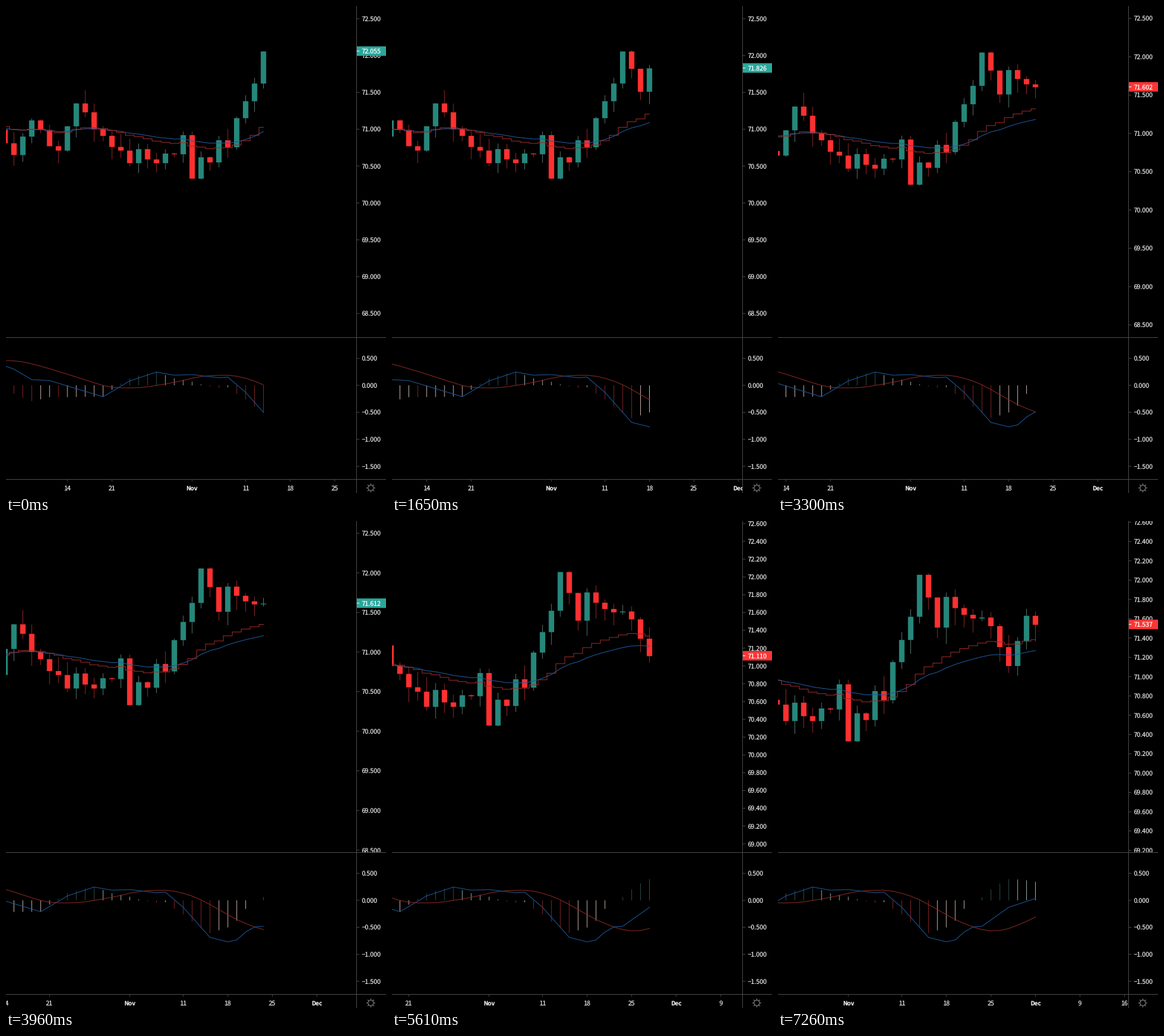
Animation, 600 px wide and 769 px high, one loop 7.59 s. Source, as a matplotlib script:

```python
import numpy as np
import matplotlib.pyplot as plt
from matplotlib.animation import FuncAnimation
from matplotlib.patches import Circle, Rectangle

W, H, DPI = 600, 769, 64
PX = 72 / DPI                      # points per pixel
FRAMES, INTERVAL = 23, 330

# Bars are numbered so that bar 0 is the newest one when the loop starts.
FIRST, LAST = -29, 13
LAST_X, GAP, BODY = 406.5, 14.07, 8.6
AXIS_X, SPLIT_Y, TIME_Y = 553.5, 523.5, 747.5
ZERO_Y, UNIT = 599, 85.2           # oscillator zero line and pixels per 1.0
DATES = {-22: "14", -17: "21", -8: "Nov", -2: "11", 3: "18", 8: "25",
         13: "Dec", 18: "9", 23: "16"}

BG, RULE, LABEL = "#000000", "#484848", "#e0e0e0"
UP, DOWN = "#26877b", "#ff3030"
UP_WICK, DOWN_WICK = "#52706a", "#902626"
UP_TAG, DOWN_TAG = "#2aa79b", "#ff3535"
BLUE, RED = "#1d5aa0", "#a02a29"
MACD, SIGNAL = "#1c5799", "#8c2822"

plt.rcParams.update({"font.family": "Noto Sans CJK JP", "path.snap": False,
                     "text.hinting": "none"})


def ema(values, length, start):
    out = [start]
    for v in values[1:]:
        out.append(out[-1] + (v - out[-1]) * 2 / (length + 1))
    return np.array(out)


def make_wicks(body_open, body_close):
    """Random shadows, longest above falling bars, kept inside the range."""
    rng = np.random.default_rng(5)
    size = len(body_close)
    above = rng.uniform(0, 0.18, size) * np.where(body_close > body_open, 0.5, 1)
    below = rng.uniform(0, 0.18, size)
    high = np.minimum(np.maximum(body_open, body_close) + above, 72.07)
    low = np.maximum(np.minimum(body_open, body_close) - below, 70.32)
    return high, low


# Each bar opens where the one before it closed.
PRICES = np.array([
    70.997, 70.81, 70.65, 70.90, 71.12, 70.99, 70.77, 70.71, 71.04, 71.35,
    71.23, 71.00, 70.91, 70.76, 70.71, 70.54, 70.73, 70.59, 70.54, 70.67,
    70.66, 70.92, 70.33, 70.62, 70.55, 70.85, 70.756, 71.15, 71.38, 71.62,
    72.055, 71.82, 71.508, 71.826, 71.71, 71.64, 71.602, 71.612, 71.523,
    71.306, 71.110, 71.369, 71.63, 71.537])
OPEN, CLOSE = PRICES[:-1], PRICES[1:]
RISING = CLOSE > OPEN
HIGH, LOW = make_wicks(OPEN, CLOSE)
SLOW, FAST = ema(CLOSE, 34, 71.014), ema(CLOSE, 20, 71.035)

# Turning points of the oscillator: bar and pixel height in its pane.
TURNS = np.array([
    (-38, 569), (-34, 550), (-30, 563), (-28, 573.5), (-26, 590), (-24, 591.5),
    (-18, 617), (-15, 592), (-12, 578), (-10, 583), (-8, 582), (-5, 587),
    (-4, 586), (-2, 610), (1, 657.5), (3, 664.5), (4, 661.5), (5, 649),
    (6, 641), (7, 640), (10, 610), (13, 596)])
SMOOTH = 10
RAW = np.interp(np.arange(FIRST - SMOOTH + 1, LAST + 1), *TURNS.T)
SIGNAL_Y = np.convolve(RAW, np.ones(SMOOTH) / SMOOTH, "valid")
MACD_Y = RAW[SMOOTH - 1:]
HIST = SIGNAL_Y - MACD_Y
GROWING = np.diff(HIST, prepend=HIST[0] + 1) > 0
HIST_COLORS = np.where(HIST > 0,
                       np.where(GROWING, "#2b4a47", "#90a8a4"),
                       np.where(GROWING, "#c2aca5", "#822222"))

fig = plt.figure(figsize=(W / DPI, H / DPI), dpi=DPI, facecolor=BG)
ax = fig.add_axes([0, 0, 1, 1])


def box(x0, y0, x1, y1, color, z):
    ax.add_patch(Rectangle((x0, y0), x1 - x0, y1 - y0, fc=color, ec="none",
                           zorder=z))


def line(xs, ys, color, z):
    ax.plot(xs, ys, color=color, lw=PX, zorder=z)


def label(x, y, text, z, color=LABEL, size=10, **style):
    ax.text(x, y + 3.7, text, color=color, fontsize=size * PX,
            va="baseline", zorder=z, **style)


def axis_label(y, text, z, color=LABEL, tick=RULE):
    line([554.5, 557.5], [y, y], tick, z)
    label(562, y, text, z, color)


def draw_candles(x, to_y, n):
    up = RISING[:n]
    ax.vlines(x, to_y(HIGH[:n]), to_y(LOW[:n]), lw=PX, zorder=1,
              colors=np.where(up, UP_WICK, DOWN_WICK))
    top = to_y(np.maximum(OPEN, CLOSE)[:n])
    bottom = to_y(np.minimum(OPEN, CLOSE)[:n])
    ax.bar(x, np.maximum(bottom - top, 1), BODY, top, lw=0, zorder=2,
           color=np.where(up, UP, DOWN))


def draw_oscillator(x, n):
    ax.vlines(x, ZERO_Y, ZERO_Y - HIST[:n], lw=PX, zorder=1,
              colors=HIST_COLORS[:n])
    line(x, SIGNAL_Y[:n], SIGNAL, 2)
    line(x, MACD_Y[:n], MACD, 2)
    for v in (0.5, 0, -0.5, -1, -1.5):
        axis_label(ZERO_Y - v * UNIT, f"{v:.3f}".replace("-", "\u2212"), 4)


def draw_price_axis(to_y, scale):
    step = 0.2 if scale * 0.2 > 26 else 0.5
    for p in np.arange(68, 72.75, step):
        if -6 < to_y(p) < SPLIT_Y + 6:
            axis_label(to_y(p), f"{p:.3f}", 1)
    box(554, SPLIT_Y, W, H, BG, 3)


def draw_tag(to_y, last):
    y = to_y(CLOSE[last]) - 0.6
    box(554, y - 7.5, W, y + 7.5, UP_TAG if RISING[last] else DOWN_TAG, 5)
    axis_label(y, f"{CLOSE[last]:.3f}", 6, "white", "white")


def draw_time_axis(shift):
    for bar, text in DATES.items():
        x = LAST_X + (bar - shift) * GAP
        if -12 < x < 565:
            line([x, x], [TIME_Y, TIME_Y + 3], RULE, 1)
            month = text.isalpha()
            label(x, 761.5, text, 1, size=9.4 if month else 10, ha="center",
                  weight="bold" if month else "normal")


def draw_gear(x, y):
    ax.add_patch(Circle((x, y), 4.3, fill=False, ec="#8c8c8c", lw=PX,
                        zorder=5))
    for a in np.arange(8) * np.pi / 4:
        r = np.array([5, 6.6])
        line(x + r * np.cos(a), y + r * np.sin(a), "#8c8c8c", 5)


def draw(frame):
    ax.clear()
    ax.set(xlim=(0, W), ylim=(H, 0))
    ax.set_autoscale_on(False)
    ax.axis("off")

    shift = int(0.58 * frame + 0.65)    # bars added so far
    n = shift - FIRST + 1
    scale = np.interp(shift, (3, 6, 8, 10, 11, 13),
                      (116.4, 121, 129.2, 140.5, 145.4, 152.4))
    base = 194.6 + 1.42 * (scale - 116.4)
    x = LAST_X + (np.arange(n) + FIRST - shift) * GAP

    def to_y(price):
        return base - (price - 71) * scale

    draw_candles(x, to_y, n)
    line(x, to_y(SLOW[:n]), BLUE, 3)
    ax.step(x, to_y(FAST[:n]), where="mid", color=RED, lw=PX, zorder=3)
    draw_oscillator(x, n)
    draw_time_axis(shift)
    draw_price_axis(to_y, scale)
    draw_tag(to_y, n - 1)

    line([AXIS_X, AXIS_X], [0, H], RULE, 4)
    for y in (SPLIT_Y, TIME_Y):
        line([0, W], [y, y], RULE, 4)
    draw_gear(576, 761)
    return []


anim = FuncAnimation(fig, draw, frames=FRAMES, interval=INTERVAL,
                     init_func=lambda: draw(0), repeat=True, repeat_delay=0)
plt.show()
```
